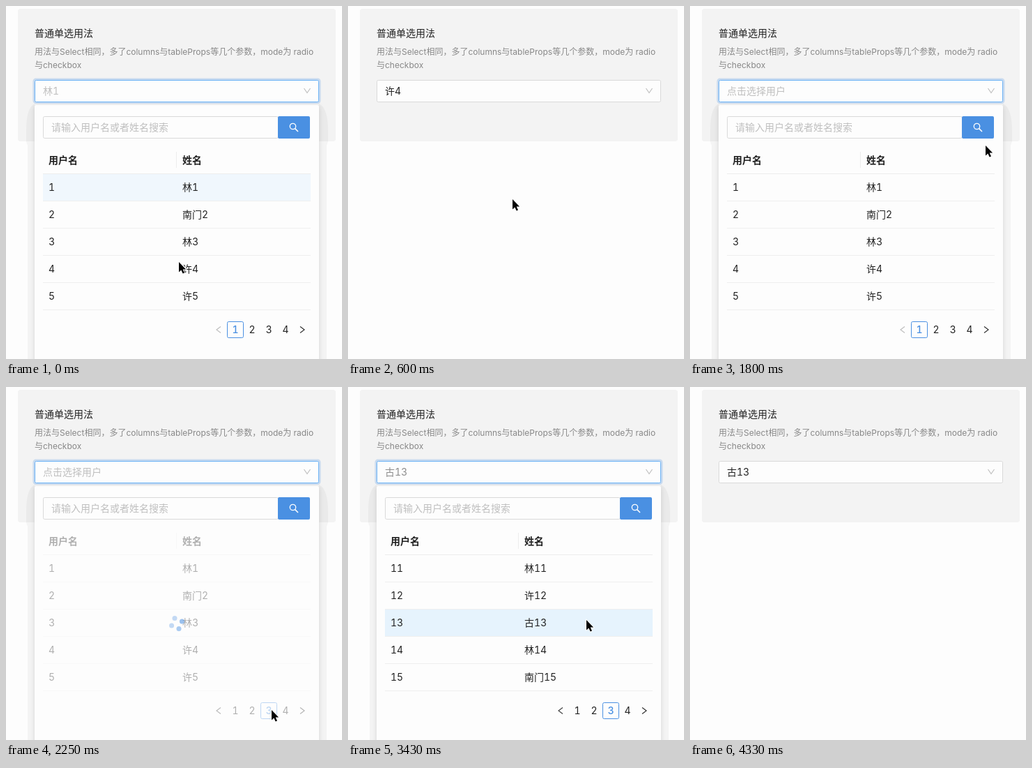
Write an HTML page that moves like this. It is 482x506 px and loops after 4.77 s.

```html
<!DOCTYPE html>
<html lang="zh-CN">
<head>
<meta charset="utf-8">
<style>
html, body { margin: 0; width: 100%; height: 100%; overflow: hidden; background: #fdfdfd; }
svg { display: block; width: 482px; height: 506px; }
text { font: 14px Inter, "Noto Sans CJK SC", "Noto Sans CJK", sans-serif; font-variant-numeric: tabular-nums; white-space: pre; }
</style>
</head>
<body>
<svg id="stage" viewBox="0 0 482 506"></svg>
<script>
const LOOP = 4770, BLUE = '#4a90e2', LIGHT = '#69b1f5', INK = '#222', PALE = '#bfbfbf';
const stage = document.getElementById('stage');

// The picture changes only at these times.
const ticks = [...Array.from({ length: 19 }, (_, i) => i * 150),
  2840, 3140, 3290, 3430, 3580, 3730, 3880, 4180, 4330];

// Pointer way: time, x, y
const way = [
  [0, 248, 367], [300, 256, 374], [450, 249, 335], [600, 236, 277], [900, 207, 160],
  [1050, 197, 131], [1200, 197, 131], [1350, 310, 127], [1500, 431, 121], [1650, 431, 121],
  [1800, 424, 200], [2100, 381, 463], [2700, 381, 463], [2840, 381, 465], [3140, 366, 420],
  [3290, 346, 348], [3430, 342, 334], [3580, 342, 334], [3880, 385, 385], [4180, 411, 429]
];

// Changes of state, each kept until overridden
const cues = [
  [0, { value: '林1', ink: PALE, open: 1, focus: 2, sel: 0, hover: -1, page: 1, data: 1, fade: 1 }],
  [150, { hover: 3 }],
  [300, { value: '许4', ink: '#8c8c8c', sel: 3 }],
  [450, { open: 0.4, focus: 1, ink: INK, hover: -1 }],
  [600, { open: 0, focus: 0 }],
  [1050, { focus: 1 }],
  [1200, { open: 1, ink: '#aaa' }],
  [1350, { focus: 2, ink: PALE }],
  [1650, { value: '', sel: -1 }],
  [2250, { page: 3, fade: 0.35 }],
  [2700, { data: 3, fade: 0.7 }],
  [2840, { fade: 1 }],
  [3290, { hover: 2 }],
  [3430, { value: '古13', ink: '#8c8c8c', sel: 2 }],
  [3580, { open: 0.4, focus: 1, ink: INK, hover: -1 }],
  [3730, { open: 0, focus: 0 }]
];

const people = {
  1: ['林', '南门', '林', '许', '许'],
  3: ['林', '许', '古', '林', '南门']
};

const text = (x, y, s, fill = INK, style = '') =>
  `<text x="${x}" y="${y}" fill="${fill}" style="${style}">${s}</text>`;
const rect = (x, y, w, h, fill, more = '') =>
  `<rect x="${x}" y="${y}" width="${w}" height="${h}" fill="${fill}" ${more}/>`;
const line = (d, stroke, width = 1) =>
  `<path d="${d}" fill="none" stroke="${stroke}" stroke-width="${width}"/>`;

function pointerAt(t) {
  const i = way.findIndex(p => p[0] >= t);
  if (i < 0) return null;
  const [t1, x1, y1] = way[i], [t0, x0, y0] = way[Math.max(0, i - 1)];
  const k = t1 > t0 ? (t - t0) / (t1 - t0) : 1;
  return { x: x0 + (x1 - x0) * k, y: y0 + (y1 - y0) * k };
}

function card() {
  const small = 'font-size:12px';
  return rect(17, 4, 456, 190, '#f3f3f3', 'rx="4"') +
    text(41, 44, '普通单选用法') +
    text(41, 69.5, '用法与Select相同，多了columns与tableProps等几个参数，mode为 radio', '#888', small) +
    text(41, 88.5, '与checkbox', '#888', small);
}

function select(s, over) {
  const glow = s.focus > 1 ? rect(40, 105, 410, 33.5, 'none', `rx="3" stroke="${BLUE}" stroke-opacity=".25" stroke-width="3"`) : '';
  const icon = over && s.value
    ? `<circle cx="432" cy="121.5" r="6" fill="${PALE}"/>` + line('M430 119.5l4 4m0-4l-4 4', '#fff', 1.2)
    : line('M427.5 118l4.5 6.5 4.5-6.5', PALE, 1.2);
  return glow +
    rect(41.5, 106.5, 407, 31, '#fdfdfd', `rx="2" stroke="${s.focus ? LIGHT : '#d9d9d9'}"`) +
    text(53, 126.5, s.value || '点击选择用户', s.value ? s.ink : PALE) + icon;
}

function table(s) {
  let out = text(61, 226, '用户名', INK, 'font-weight:600') + text(253, 226, '姓名', INK, 'font-weight:600') +
    line('M244.5 209v23M53 240.5h384', '#ededed');
  people[s.data].forEach((name, i) => {
    const y = 241 + 39 * i, n = (s.data - 1) * 5 + i + 1;
    const fill = i === s.sel ? (i === s.hover ? '#e6f3fd' : '#f0f7fd') : i === s.hover ? '#fafafa' : 'none';
    out += rect(53, y, 384, 38, fill) + line(`M53 ${y + 38.5}h384`, '#efefef') +
      text(61, y + 24, n) + text(253, y + 24, name + n);
  });
  return out;
}

function pages(s, hot) {
  let out = line('M308 459.5l-6 4.5 6 4.5', s.page > 1 ? '#444' : PALE, 1.2) +
    line('M422 459.5l6 4.5-6 4.5', '#333', 1.2);
  for (let n = 1; n <= 4; n++) {
    const x = 305 + 24 * n, on = n === s.page;
    const ink = n === 3 && hot ? LIGHT : on ? BLUE : INK;
    if (on) out += rect(x - 11.5, 452.5, 23, 23, '#fdfdfd', `rx="2" stroke="${ink}"`);
    out += text(x, 469, n, ink, 'text-anchor:middle' + (on ? ';font-weight:500' : ''));
  }
  return out;
}

function spinner(t) {
  let out = '';
  for (let i = 0; i < 4; i++) {
    const a = (-22 + 90 * i + (t - 2250) * 0.3) * Math.PI / 180;
    const glow = 0.3 + 0.25 * (1 + Math.cos((t - 2250) / 1000 * Math.PI - i * 1.25)) / 2;
    out += `<circle cx="${245 + 8 * Math.cos(a)}" cy="${339 + 8 * Math.sin(a)}" r="3.5" fill="${BLUE}" opacity="${glow}"/>`;
  }
  return out;
}

function panel(s, t, hot) {
  if (!s.open) return '';
  const squash = 0.8 + 0.2 * s.open;
  return `<g opacity="${s.open}" transform="translate(0 ${142 * (1 - squash)}) scale(1 ${squash})">` +
    `<path d="M41 140Q29 146 29 178V194L31 200V650H460V200L462 194V178Q462 146 449 140V142H41Z" opacity=".036"/>` +
    rect(41, 142, 408, 500, '#fdfdfd', 'rx="2" style="filter:drop-shadow(0 2px 3px rgba(0,0,0,.13))"') +
    rect(53.5, 158.5, 337, 31, '#fdfdfd', 'rx="2" stroke="#d9d9d9"') +
    text(65, 179, '请输入用户名或者姓名搜索', PALE) +
    rect(390, 158, 46, 32, BLUE, 'rx="2"') +
    `<circle cx="411.5" cy="172.5" r="4.2" fill="none" stroke="#fff" stroke-width="1.3"/>` +
    line('M414.6 175.6l4.4 4.4', '#fff', 1.5) +
    `<g opacity="${s.fade}">${table(s)}${pages(s, hot)}</g>` +
    (s.fade < 1 ? spinner(t) : '') + '</g>';
}

function pointer(p, hand) {
  const shape = hand
    ? `<path d="M-1.5 1.5q0-1.5 1.5-1.5q1.5 0 1.5 1.5v5q1-1 2.5 0q1.2-.8 2.4.4q1.8-.5 2 1.3v4l-1.5 3v2h-7l-1-2-4-5q-.8-1.5.8-2q1.2 0 2.8 2z" fill="#fff" stroke="#000" stroke-width="1.2"/>` +
      line('M1.2 10.5v4m2.3-4v4m2.3-4v4', '#000', 0.9)
    : '<path d="M0 0v14.5l3.3-3.1 2.4 5.2 2.3-1-2.3-5h4.4z" stroke="#fff" stroke-width="1.6" paint-order="stroke"/>';
  return `<g transform="translate(${p.x} ${p.y})">${shape}</g>`;
}

function draw(t) {
  const s = Object.assign({}, ...cues.filter(c => c[0] <= t).map(c => c[1]));
  const p = pointerAt(t);
  const over = p && p.y > 105 && p.y < 138;
  const hot = p && s.open && s.fade === 1 && p.y > 452 && p.x > 365;
  stage.innerHTML = card() + panel(s, t, hot) + select(s, over) + (p ? pointer(p, over || hot) : '');
}

let shown = -1;
const start = performance.now();
function loop() {
  const now = (performance.now() - start) % LOOP;
  const t = ticks.filter(k => k <= now).pop();
  if (t !== shown) draw(shown = t);
  requestAnimationFrame(loop);
}
loop();
</script>
</body>
</html>
```
